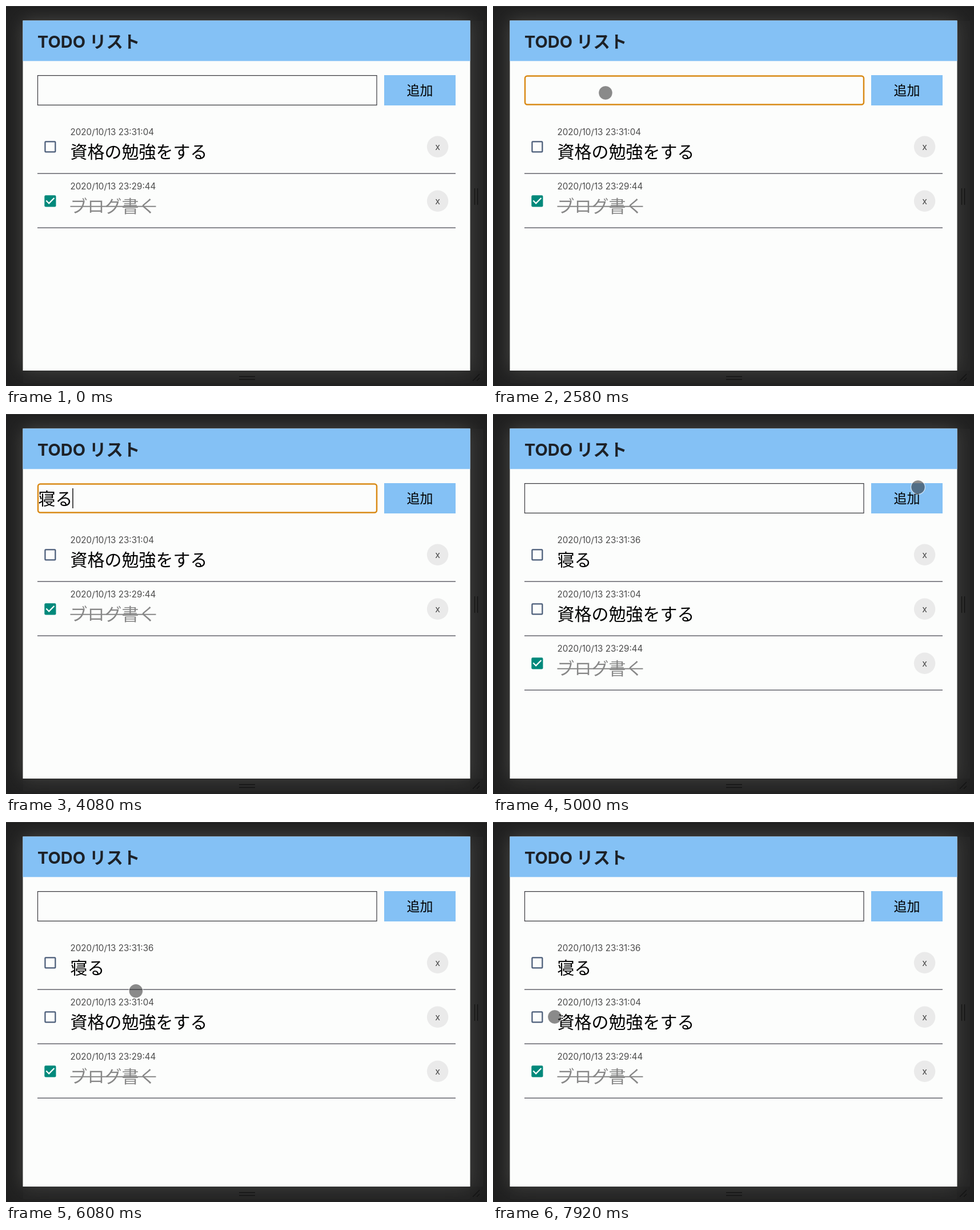
Write an HTML page with a canvas that moves like this. It is 842 px wide and 665 px high and loops after 8000 ms.

```html
<!DOCTYPE html>
<html lang="ja">
<head>
<meta charset="utf-8">
<title>TODO リスト</title>
<style>
html, body { margin: 0; width: 100%; height: 100%; overflow: hidden; background: #202020; }
canvas { display: block; width: 842px; height: 665px; }
</style>
</head>
<body>
<canvas id="stage"></canvas>
<script>
const W = 842, H = 665, LOOP = 8000, STEP = 1000 / 12;
const LATIN = 'Inter, "Noto Sans CJK JP", sans-serif';
const KANJI = '"Noto Sans CJK JP", "Noto Sans CJK", sans-serif';
const BLUE = '#84c1f5', PAPER = '#fcfdfc', GRAY = '#878787', SLATE = '#4a5c78';

const canvas = document.getElementById('stage');
const ratio = window.devicePixelRatio || 1;
canvas.width = W * ratio;
canvas.height = H * ratio;
const c = canvas.getContext('2d');

function rect(x, y, w, h, color) {
  c.fillStyle = color;
  c.fillRect(x, y, w, h);
}

function frame(x, y, w, h, r, width, color) {
  c.strokeStyle = color;
  c.lineWidth = width;
  c.beginPath();
  c.roundRect(x, y, w, h, r);
  c.stroke();
}

function disc(x, y, r, color) {
  c.fillStyle = color;
  c.beginPath();
  c.arc(x, y, r, 0, Math.PI * 2);
  c.fill();
}

function line(x1, y1, x2, y2, width, color) {
  c.strokeStyle = color;
  c.lineWidth = width;
  c.beginPath();
  c.moveTo(x1, y1);
  c.lineTo(x2, y2);
  c.stroke();
}

function label(text, x, y, font, color, align = 'left') {
  c.font = font;
  c.fillStyle = color;
  c.textAlign = align;
  c.fillText(text, x, y);
}

function drawSurround() {
  rect(0, 0, W, H, '#202020');
  c.save();
  c.shadowColor = '#4a4a47';
  c.shadowBlur = 30 * ratio;
  rect(29.5, 25.5, 783, 612.5, PAPER);
  c.restore();
  rect(813, 26, 22, 612, 'rgba(50,50,48,.25)');
  rect(30, 638, 782, 22, 'rgba(45,45,44,.25)');
  rect(0, 0, W, 2, '#2c2c2c');
  rect(0, 2, W, 1, '#161616');
  for (const d of [0, 5]) {
    line(820.5 + d, 319, 820.5 + d, 348, 1.3, '#121212');
    line(408, 648.5 + d, 436, 648.5 + d, 1.3, '#121212');
  }
  line(817, 656, 829, 644, 1.3, '#121212');
  line(824, 656, 829, 651, 1.3, '#121212');
}

function drawHeader() {
  rect(29.5, 25.5, 783, 70.8, BLUE);
  label('TODO', 55, 73, 'bold 29px ' + LATIN, '#1d2127');
  label('リスト', 146, 73, 'bold 29.5px ' + KANJI, '#1d2127');
}

function drawForm(s) {
  if (s.focus) frame(56, 122.5, 593, 50, 4, 2.5, '#d98a16');
  else frame(55.5, 121.6, 593.5, 51.8, 0, 1.2, '#3a3a3f');
  label(s.typed, 56.5, 158.5, '30px ' + KANJI, '#000');
  c.font = '30px ' + KANJI;
  const end = 57 + c.measureText(s.typed).width;
  if (s.composing) line(58, 164, end - 1, 164, 2, '#222');
  if (s.caret) line(Math.max(58, end), 130, Math.max(58, end), 165, 1.5, '#111');
  rect(662, 121, 125, 53, BLUE);
  label('追加', 724.5, 156, '23px ' + KANJI, '#000', 'center');
}

function drawCheck(x, y, done) {
  const k = 1.12;
  c.save();
  c.translate(x - 12 * k, y - 12 * k);
  c.scale(k, k);
  if (done) {
    c.fillStyle = '#00897b';
    c.beginPath();
    c.roundRect(3, 3, 18, 18, 2);
    c.fill();
    c.fillStyle = '#fff';
    c.fill(new Path2D('M10 17l-5-5 1.41-1.41L10 14.17l7.59-7.59L19 8z'));
  } else {
    frame(4, 4, 16, 16, 1, 2, SLATE);
  }
  c.restore();
}

function drawItem(item, row) {
  const y = 198 + row * 95;
  drawCheck(77.4, y + 48.3, item.done);
  label('2020/10/13 ' + item.time, 112.5, y + 28, '15.2px ' + LATIN, '#4c4c4c');
  label(item.text, 112.5, y + 68, '30px ' + KANJI, item.done ? GRAY : '#000');
  if (item.done) {
    const w = c.measureText(item.text).width;
    line(112.5, y + 57.7, 112.5 + w, y + 57.7, 2, GRAY);
  }
  disc(755.6, y + 48.3, 18.7, '#eaeaea');
  label('x', 755.6, y + 54, '16px ' + LATIN, '#484848', 'center');
  line(55, y + 95.2, 787, y + 95.2, 1.3, '#45454f');
}

// Pointer stops: time, x, y
const path = [
  [1000, 148, 227], [1330, 167, 187], [1750, 197, 152], [3000, 197, 152],
  [4250, 420, 165], [4830, 744, 128], [5500, 744, 128],
  [6330, 88, 341], [7250, 88, 341], [7580, 108, 341], [8000, 108, 341]
];

function pointerAt(t) {
  let i = 1;
  while (i < path.length - 1 && t > path[i][0]) i++;
  const [t0, x0, y0] = path[i - 1], [t1, x1, y1] = path[i];
  const p = Math.min(1, Math.max(0, (t - t0) / (t1 - t0)));
  const e = p * p * (3 - 2 * p);
  return [x0 + (x1 - x0) * e, y0 + (y1 - y0) * e];
}

function drawArrow(x, y) {
  c.save();
  c.translate(x, y);
  c.scale(0.88, 0.94);
  c.shadowColor = 'rgba(0,0,0,.35)';
  c.shadowBlur = 3 * ratio;
  c.shadowOffsetY = ratio;
  const arrow = new Path2D('M0 0V17L4 13.3L6.8 20L9.8 18.7L7 12.2H12Z');
  c.lineWidth = 2;
  c.strokeStyle = '#fff';
  c.stroke(arrow);
  c.shadowColor = 'transparent';
  c.fillStyle = '#000';
  c.fill(arrow);
  c.restore();
}

function drawPointer(t) {
  if (t < 1000 || (t >= 2830 && t < 4250)) return;
  const [x, y] = pointerAt(t);
  if (t < 1500) return drawArrow(x, y);
  disc(x, y, 12, 'rgba(40,40,40,.54)');
  c.strokeStyle = 'rgba(255,255,255,.55)';
  c.lineWidth = 1.5;
  c.beginPath();
  c.arc(x, y, 12.4, 0, Math.PI * 2);
  c.stroke();
}

// Typing stages: start time, text
const typing = [[2910, 'n'], [3000, 'ね'], [3170, 'ねr'], [3250, 'ねる'], [3580, '寝る'], [5000, '']];

function stateAt(t) {
  let typed = '';
  for (const [start, text] of typing) if (t >= start) typed = text;
  return {
    typed,
    focus: t >= 2160 && t < 5000,
    composing: t >= 2910 && t < 3830,
    caret: t >= 2830 && t < 4900,
    added: t >= 5000,
    studied: t >= 6500 && t < 7400
  };
}

function draw(t) {
  const s = stateAt(t);
  c.setTransform(ratio, 0, 0, ratio, 0, 0);
  c.textBaseline = 'alphabetic';
  drawSurround();
  drawHeader();
  drawForm(s);
  const items = [
    { time: '23:31:04', text: '資格の勉強をする', done: s.studied },
    { time: '23:29:44', text: 'ブログ書く', done: true }
  ];
  if (s.added) items.unshift({ time: '23:31:36', text: '寝る', done: false });
  items.forEach(drawItem);
  drawPointer(t);
}

const begin = performance.now();
function tick() {
  const t = (performance.now() - begin) % LOOP;
  draw(Math.floor((t + 4) / STEP) * STEP);
  requestAnimationFrame(tick);
}
tick();
</script>
</body>
</html>
```
